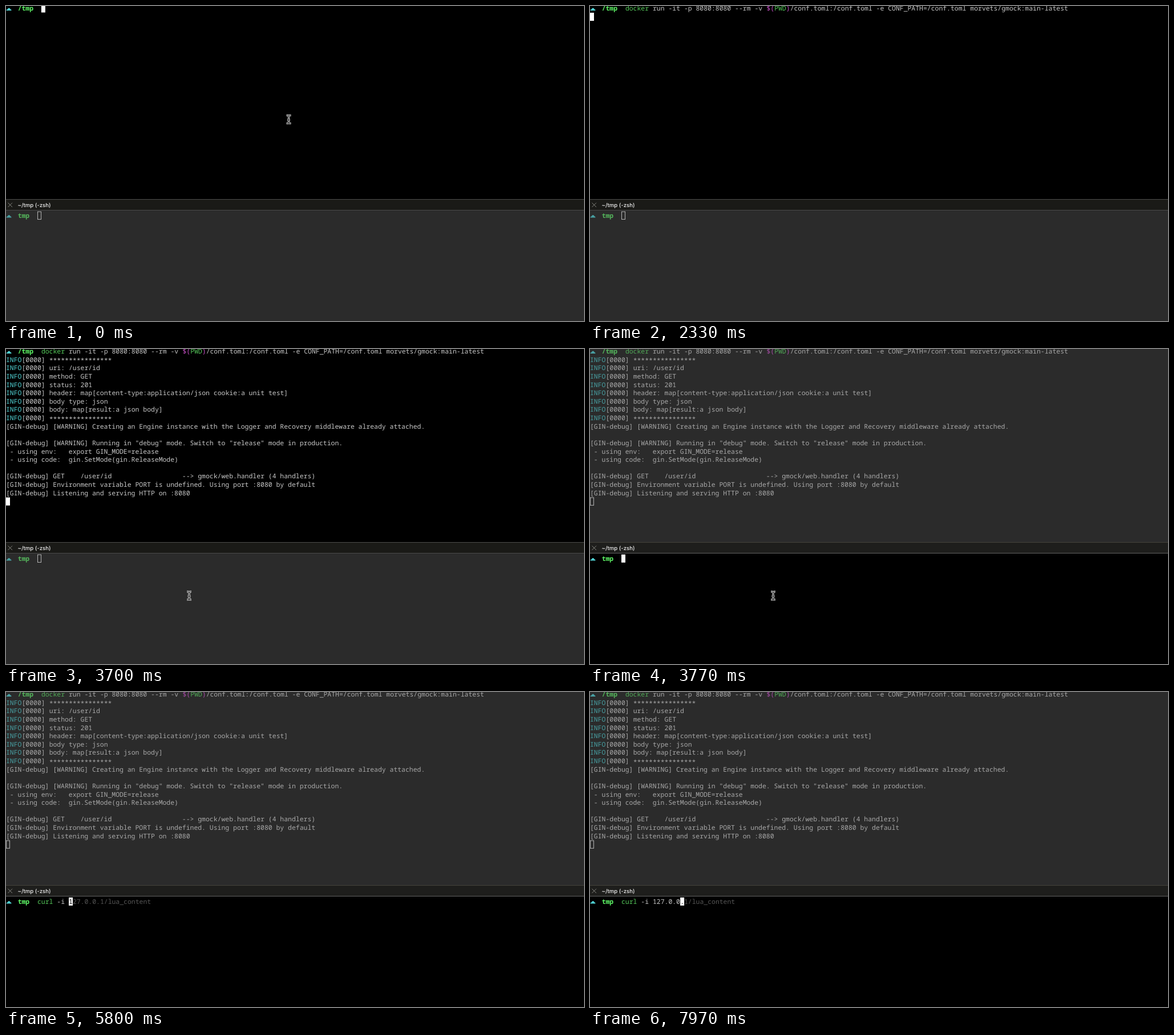
Animation of 1013x553 px, one loop 8 s. Source, as an HTML page:

```html
<!DOCTYPE html>
<html lang="en">
<head>
<meta charset="utf-8">
<title>Terminal</title>
<style>
html, body { margin: 0; width: 100%; height: 100%; overflow: hidden; background: #000; }
svg { display: block; width: 100vw; height: 100vh; }
text { white-space: pre; font: 11.458px "Noto Sans Mono", monospace; font-variant-ligatures: none; text-rendering: geometricPrecision; }
text.bold { font-weight: 700; }
text.title { font: 500 9.6px Inter, sans-serif; }
</style>
</head>
<body>
<svg id="stage" viewBox="0 0 1013 553" preserveAspectRatio="none">
  <g id="screen"></g>
  <g id="mouse" fill="none">
    <path stroke="#fff" stroke-width="3" d="M-4-7H-2Q0-7 0-5Q0-7 2-7H4M-4 7H-2Q0 7 0 5Q0 7 2 7H4M0-6V6M-2.4 1H2.4"/>
    <path stroke="#000" stroke-width="1.1" d="M-4-7H-2Q0-7 0-5Q0-7 2-7H4M-4 7H-2Q0 7 0 5Q0 7 2 7H4M0-6V6M-2.4 1H2.4"/>
  </g>
</svg>
<script>
const LOOP = 8000, CW = 6.875, LH = 14.63;
const ENTER = 1670, OUTPUT = 2600, SWAP = 3770, RECALL = 530;
const screen = document.getElementById('screen');
const mouse = document.getElementById('mouse');

const bright = { bg: '#000', text: '#c7c7c7', green: '#55c95a', prompt: '#5ff967', cyan: '#4fd0d2', pink: '#cf52cf', red: '#e0564f', ghost: '#555' };
const dim = { bg: '#2b2b2b', text: '#a8a8a8', green: '#50a856', prompt: '#55b65c', cyan: '#489fa2', pink: '#a94da9', red: '#b5504b', ghost: '#666' };

const command = [
  ['docker', 'green'], [' run -it -p 8080:8080 --rm -v '], ['$(', 'pink'], ['PWD', 'green'], [')', 'pink'],
  ['/conf.toml:/conf.toml -e CONF_PATH=/conf.toml morvets/gmock:main-latest']
];
const stars = '*'.repeat(16);
const info = [
  stars, 'uri: /user/id', 'method: GET', 'status: 201',
  'header: map[content-type:application/json cookie:a unit test]',
  'body type: json', 'body: map[result:a json body]', stars
];
const log = [
  '[GIN-debug] [WARNING] Creating an Engine instance with the Logger and Recovery middleware already attached.',
  '',
  '[GIN-debug] [WARNING] Running in "debug" mode. Switch to "release" mode in production.',
  ' - using env:   export GIN_MODE=release',
  ' - using code:  gin.SetMode(gin.ReleaseMode)',
  '',
  '[GIN-debug] GET    /user/id' + ' '.repeat(18) + '--> gmock/web.handler (4 handlers)',
  '[GIN-debug] Environment variable PORT is undefined. Using port :8080 by default',
  '[GIN-debug] Listening and serving HTTP on :8080'
];

const typed = 'curl -i 127.0.0';
const keyTimes = [4430, 4530, 4630, 4740, 4990, 5250, 5400, 5700, 6430, 6590, 6830, 7100, 7300, 7470, 7750];
const userHint = 'curl  -i 127.0.0.1:8080/user/id';
const luaHint = 'curl -i 127.0.0.1/lua_content';

// A pane draws text and cursors on a character grid.
function pane(top, colors) {
  const y = row => top + row * LH;
  const put = (row, col, str, color = 'text', cls = '', dy = 0) =>
    `<text class="${cls}" x="${col * CW}" y="${y(row) + 11 + dy}" fill="${colors[color] || color}">${str}</text>`;
  const cursor = (row, col, active) => active
    ? `<rect x="${col * CW}" y="${y(row) + .2}" width="7" height="14.2" fill="#fff"/>`
    : `<rect x="${col * CW + .5}" y="${y(row) + .6}" width="6" height="13.4" fill="none" stroke="#b4b4b4"/>`;
  const prompt = name =>
    `<path transform="translate(0 ${top + 11})" fill="${colors.cyan}" d="M.6 0Q.6-2.3 2.6-2.3Q3.4-4.6 5.2-4.6Q7.2-4.5 7.6-2.6Q9.6-2.3 9.6 0Z"/>` +
    put(0, 3, name, 'prompt', 'bold');
  return { put, cursor, prompt };
}

function upper(t, active) {
  const colors = active ? bright : dim;
  const { put, cursor, prompt } = pane(-3, colors);
  let out = `<rect width="1013" height="339" fill="${colors.bg}"/>` + prompt('/tmp');
  let row = 0, col = 9;
  if (t >= RECALL) {
    for (const [str, color] of command) {
      out += put(0, col, str, color);
      col += str.length;
    }
  }
  if (t >= ENTER) { row = 1; col = 0; }
  if (t >= OUTPUT) {
    for (const line of info) {
      out += put(row, 0, 'INFO', 'cyan') + put(row, 4, '[0000]');
      out += put(row++, 11, line, 'text', '', line === stars ? 1.6 : 0);
    }
    for (const line of log) out += put(row++, 0, line);
  }
  return out + cursor(row, col, active);
}

function lower(count, active) {
  const colors = active ? bright : dim;
  const { put, cursor, prompt } = pane(360.5, colors);
  const start = 8, col = start + count;
  let out = `<rect y="358" width="1013" height="195" fill="${colors.bg}"/>` + prompt('tmp');
  if (count) {
    out += put(0, start, typed.slice(0, Math.min(count, 4)), count < 4 ? 'red' : 'green');
    if (count > 4) out += put(0, start + 4, typed.slice(4, count));
    const hint = count < 6 ? userHint : luaHint;
    out += put(0, col + 1, hint.slice(count + 1), 'ghost');
    return out + cursor(0, col, true) + put(0, col, hint[count], '#000');
  }
  return out + cursor(0, col, active);
}

function titleBar(topActive) {
  const edges = topActive ? ['#4d4d4b', '#4b4b4b'] : ['#44423a', '#626262'];
  return `<rect y="339" width="1013" height="20" fill="${topActive ? '#1a1a17' : '#1e1e1c'}"/>` +
    `<path d="M0 339.5H1013" stroke="${edges[0]}"/><path d="M0 358.5H1013" stroke="${edges[1]}"/>` +
    '<path d="M3.5 345.5L11 353M11 345.5L3.5 353" stroke="#85857f" fill="none"/>' +
    '<text class="title" x="20.5" y="352.8" fill="#f2f2f2">~/tmp (-zsh)</text>';
}

function moveMouse(t) {
  const shown = t < RECALL || (t >= 3030 && t < keyTimes[0]) || (t >= 6100 && t < 6400);
  const p = Math.min(1, Math.max(0, (t - 3030) / 570));
  const e = p * p * (3 - 2 * p);
  mouse.setAttribute('visibility', shown ? 'visible' : 'hidden');
  mouse.setAttribute('transform', `translate(${495.5 - 174.5 * e} ${199 + 234 * e})`);
}

let lastKey = '';
function render(t) {
  const topActive = t < SWAP;
  const count = keyTimes.filter(k => t >= k).length;
  const key = [RECALL, ENTER, OUTPUT, SWAP].map(k => t >= k) + '|' + count;
  if (key !== lastKey) {
    screen.innerHTML = upper(t, topActive) + lower(count, !topActive) + titleBar(topActive);
    lastKey = key;
  }
  moveMouse(t);
}

const begin = performance.now();
function tick() {
  render((performance.now() - begin) % LOOP);
  requestAnimationFrame(tick);
}
tick();
</script>
</body>
</html>
```
